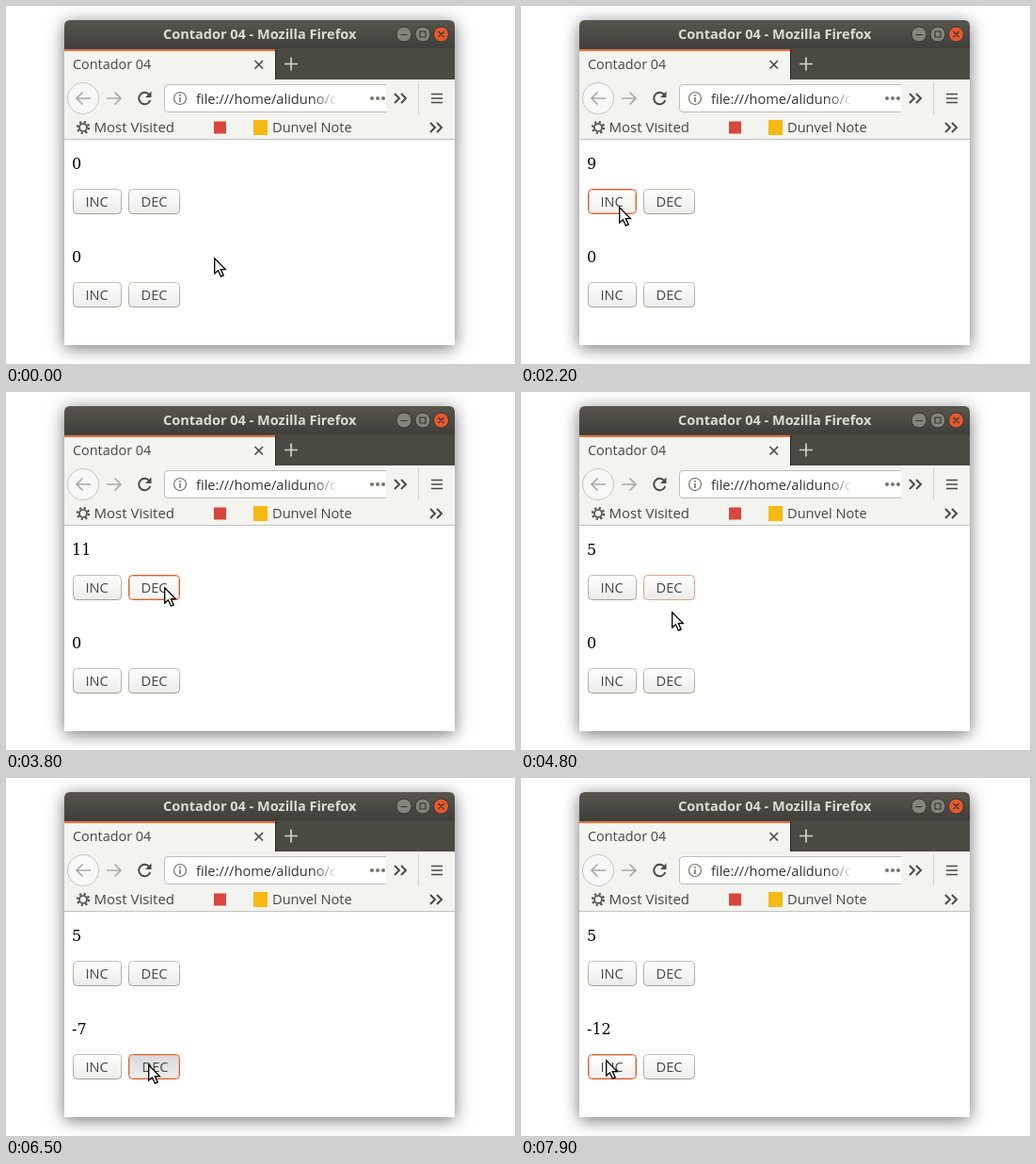
Write an HTML page that moves like this. It is 541 px wide and 380 px high and loops after 8 s.

```html
<!DOCTYPE html>
<html lang="es">
<head>
<meta charset="utf-8">
<title>Contador 04</title>
<style>
  html, body { margin: 0; width: 100%; height: 100%; overflow: hidden; background: #fff; }
  svg { display: block; }
  text { font: 14.6px "Open Sans", sans-serif; fill: #464644; }
  .title { font-size: 14.5px; font-weight: 700; fill: #dedcd3; }
  .tab { font-size: 14.4px; }
  .visited { font-size: 15px; }
  .count { font: 16px "DejaVu Serif", serif; fill: #000; }
  .line { fill: none; stroke: #4a4a48; stroke-width: 1.7; }
  .window { filter: drop-shadow(0 3px 9px rgba(0, 0, 0, .55)); }

  .face { fill: url(#up); stroke: url(#edge); }
  .glow { fill: none; stroke: none; }
  .hover .face { fill: url(#over); }
  .pressed .face { fill: url(#down); }
  .pressed text { transform: translate(1px, 0); }
  .focus .face { stroke: #dca48c; }
  .focus.hover .face { stroke: #cf6538; }
  .focus.hover .glow { stroke: #eeb89e; }
</style>
</head>
<body>
<svg width="541" height="380" viewBox="0 0 541 380">
  <defs>
    <linearGradient id="bar" x2="0" y2="1"><stop stop-color="#57564e"/><stop offset="1" stop-color="#3e3d38"/></linearGradient>
    <linearGradient id="up" x2="0" y2="1"><stop stop-color="#fefefe"/><stop offset="1" stop-color="#ececea"/></linearGradient>
    <linearGradient id="over" x2="0" y2="1"><stop stop-color="#fefefe"/><stop offset="1" stop-color="#f1f1ef"/></linearGradient>
    <linearGradient id="down" x2="0" y2="1"><stop stop-color="#d8d8da"/><stop offset="1" stop-color="#eeeeec"/></linearGradient>
    <linearGradient id="edge" x2="0" y2="1"><stop stop-color="#bfbfbd"/><stop offset="1" stop-color="#a0a09d"/></linearGradient>
    <linearGradient id="fade" gradientUnits="userSpaceOnUse" x1="326" x2="353" y1="0" y2="0">
      <stop stop-color="#333"/><stop offset="1" stop-color="#333" stop-opacity="0"/>
    </linearGradient>
    <path id="more" class="line" d="M0 0l5 5-5 5M7 0l5 5-5 5" style="stroke-width:2"/>
  </defs>

  <!-- Title bar -->
  <path class="window" d="M62 360V21q0-6 6-6H471q6 0 6 6V360z" fill="#fff"/>
  <path d="M62 46V21q0-6 6-6H471q6 0 6 6V46z" fill="url(#bar)"/>
  <text class="title" x="167" y="35">Contador 04 - Mozilla Firefox</text>
  <g fill="#85847b" stroke="#35342f">
    <circle cx="423" cy="30" r="8"/><circle cx="443" cy="30" r="8"/><circle cx="462.5" cy="30" r="8" fill="#e6592f"/>
    <path d="M419.5 30.5h7M440 27h6v6h-6zM459.5 27l6 6m0-6l-6 6" fill="none" stroke-width="1.2"/>
  </g>

  <!-- Tabs -->
  <path d="M62 45H477V78H62z" fill="#4b4a42"/>
  <path d="M62 46H286V78H62z" fill="#f4f4f0"/>
  <path d="M62 46H286v2H62z" fill="#ee7443"/>
  <path d="M286.5 46V78" stroke="#26251f"/>
  <text class="tab" x="71" y="67">Contador 04</text>
  <path class="line" d="M264.500 58l8.500 8.500m0-8.500l-8.500 8.500"/>
  <path d="M296 61.500h14m-7-7v14" stroke="#d5d4cc" stroke-width="1.7"/>

  <!-- Toolbar -->
  <path d="M62 78H477V141H62z" fill="#f3f3ef"/>
  <path d="M62 141.500H477" stroke="#c2c2be"/>
  <circle cx="82" cy="98" r="16.5" fill="#f8f8f6" stroke="#c5c5c1"/>
  <path class="line" d="M90 98H75m6.500-6.500L75 98l6.500 6.500M107 98h15m-6.500-6.500L122 98l-6.500 6.500" style="stroke:#a9a9a6"/>
  <path class="line" d="M152.500 94.500a6.200 6.200 0 1 0 .8 5.500" style="stroke-width:2"/>
  <path d="M154.500 90.500v6.500h-6.500z" fill="#4a4a48"/>
  <path d="M404 83.500H172q-3.500 0-3.500 3.500v22q0 3.500 3.500 3.500H404" fill="#fff" stroke="#bdbdb9"/>
  <circle class="line" cx="185" cy="98" r="6.5" style="stroke:#747472;stroke-width:1.2"/>
  <path d="M185 94v1.700m0 1.300v5" stroke="#747472" stroke-width="1.6"/>
  <text x="202" y="103.5" style="fill:url(#fade)">file:///home/aliduno/c</text>
  <g fill="#747472"><circle cx="389" cy="98" r="2"/><circle cx="395" cy="98" r="2"/><circle cx="401" cy="98" r="2"/></g>
  <use href="#more" x="413" y="93"/>
  <path d="M438.500 81V115" stroke="#d2d2ce"/>
  <path class="line" d="M452 93.500h12m-12 4.500h12m-12 4.500h12"/>

  <!-- Bookmarks -->
  <circle class="line" cx="82" cy="129" r="4"/>
  <circle class="line" cx="82" cy="129" r="6" style="stroke-width:2.2;stroke-dasharray:2.1 2.612"/>
  <text class="visited" x="93.5" y="134">Most Visited</text>
  <path d="M221 122.500h13v13h-13z" fill="#d9463b"/>
  <text x="211.5" y="134" transform="translate(27 0)" visibility="hidden"></text>
  <path d="M263 121h15v16h-15z" fill="#f5b912"/>
  <text x="283" y="134">Dunvel Note</text>
  <use href="#more" x="451" y="124"/>

  <!-- Page -->
  <text class="count" x="70" y="173"></text>
  <text class="count" x="70" y="272"></text>
  <g id="buttons"></g>
  <path id="cursor" d="M.7.8V17l3.700-3.300 3 6.500 2.800-1.300-2.900-6.300h5z" fill="#fff" stroke="#000" stroke-width="1.3"/>
</svg>

<script>
// All times are in ticks of 100 ms; the picture changes only on a tick.
const TICK = 100, LOOP = 80;

// Cursor stops: [time, x, y]
const path = [
  [0, 221, 267], [3, 172, 252], [4, 130, 241], [6, 113, 225], [9, 104, 213],
  [30, 118, 216], [31, 148, 212], [32, 168, 207], [47, 165, 217], [48, 160, 233],
  [49, 160, 249], [50, 159, 264], [52, 150, 312], [55, 151, 304], [72, 143, 288],
  [73, 128, 266], [74, 110, 258], [75, 97, 279], [76, 90, 299],
];

// hover and focus are [from, to); press lists ticks held down, click lists ticks of each count.
const buttons = [
  { label: "INC", x: 71, y: 194, w: 52, row: 0, step: 1, hover: [6, 30], focus: [9, 35],
    press: [9, 10, 12, 13, 15, 18, 20, 23, 24, 25, 26, 27, 28],
    click: [11, 12, 14, 15, 16, 18, 19, 21, 22, 23, 25, 26, 27, 29] },
  { label: "DEC", x: 130, y: 194, w: 55, row: 0, step: -1, hover: [32, 48], focus: [35, 55],
    press: [35, 37, 39, 41, 44, 45], click: [36, 37, 38, 40, 41, 42, 44, 46, 47] },
  { label: "INC", x: 71, y: 293, w: 52, row: 1, step: 1, hover: [75, 80], focus: [78, 80],
    press: [78], click: [79] },
  { label: "DEC", x: 130, y: 293, w: 55, row: 1, step: -1, hover: [50, 73], focus: [55, 78],
    press: [55, 57, 58, 60, 61, 63, 64, 65, 66, 67, 69],
    click: [56, 57, 59, 60, 62, 63, 65, 66, 68, 69, 70, 71, 72] },
];

const group = document.querySelector("#buttons");
group.innerHTML = buttons.map(({ label, x, y, w }) => `<g>
  <rect class="face" x="${x + .5}" y="${y + .5}" width="${w - 1}" height="26" rx="4"/>
  <rect class="glow" x="${x + 1.5}" y="${y + 1.5}" width="${w - 3}" height="24" rx="3"/>
  <text x="${x + 13.5}" y="${y + 19}">${label}</text></g>`).join("");

const counts = document.querySelectorAll(".count");
const cursor = document.querySelector("#cursor");
const within = (t, [from, to]) => t >= from && t < to;

function draw(now) {
  const t = Math.floor(now / TICK) % LOOP;
  const totals = [0, 0];
  buttons.forEach((b, i) => {
    totals[b.row] += b.step * b.click.filter(c => c <= t).length;
    const { classList } = group.children[i];
    classList.toggle("hover", within(t, b.hover));
    classList.toggle("focus", within(t, b.focus));
    classList.toggle("pressed", b.press.includes(t));
  });
  counts.forEach((el, i) => el.textContent = totals[i]);
  const [, x, y] = path.findLast(p => p[0] <= t);
  cursor.setAttribute("transform", `translate(${x} ${y})`);
  requestAnimationFrame(draw);
}
requestAnimationFrame(draw);
</script>
</body>
</html>
```
